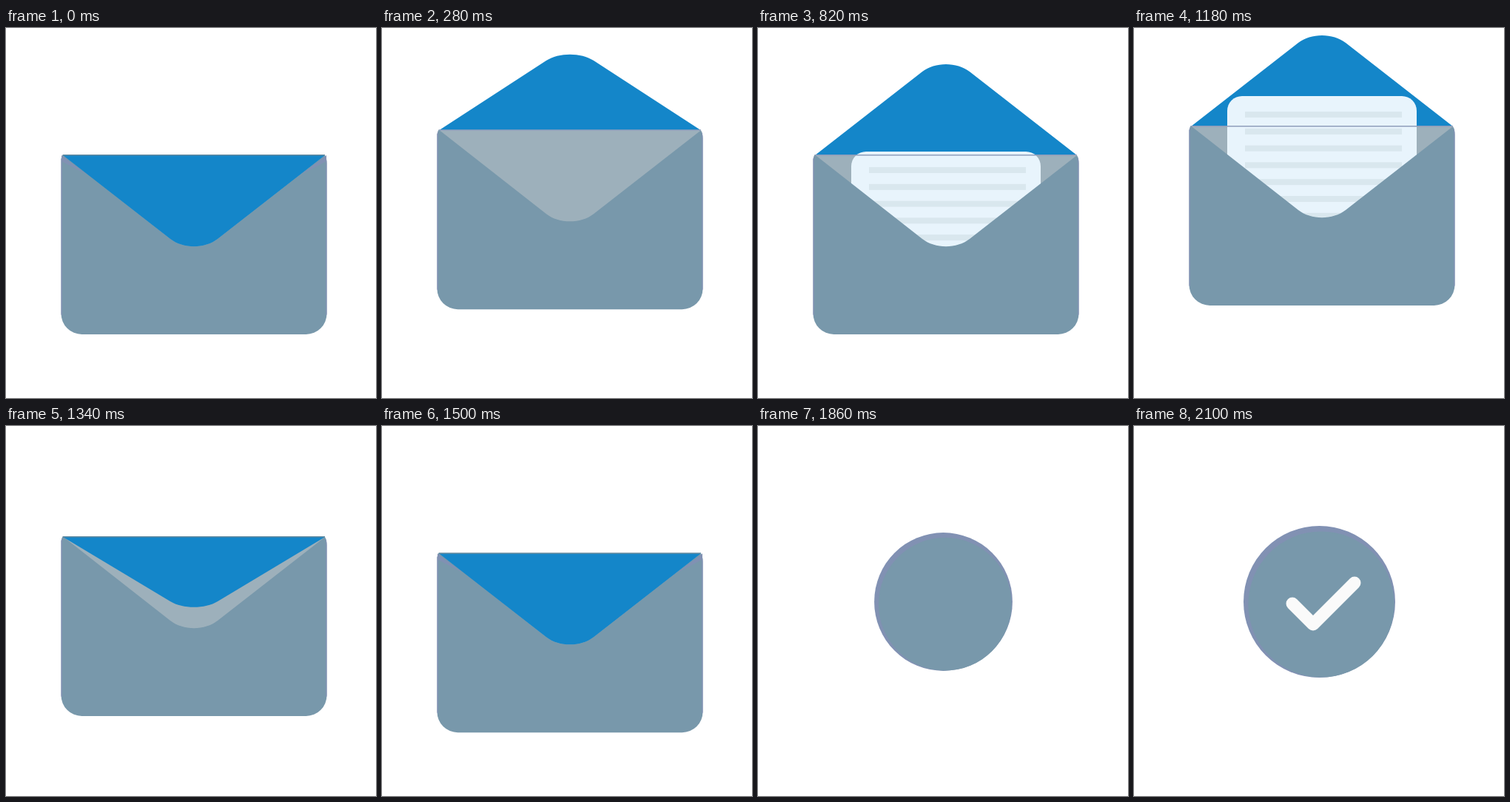
An HTML page with a canvas that plays this animation: 500 by 500 pixels, repeating every 2.4 s.

```html
<!DOCTYPE html>
<html lang="en">
<head>
<meta charset="utf-8">
<title>Letter sent</title>
<style>
html, body { margin: 0; width: 100%; height: 100%; overflow: hidden; background: #fff; }
canvas { display: block; width: 100%; height: 100%; }
</style>
</head>
<body>
<canvas id="stage" width="500" height="500"></canvas>
<script>
const g = document.getElementById('stage').getContext('2d');
const LOOP = 2400, STEP = 20;
const BLUE = '#1486c9', FRONT = '#7898ab', BACK = '#9db0bb', RIM = '#8191b3';
const PAPER = '#e8f4fc', RULE = '#d9e7ee';

// Monotone cubic through [time, value] keys, held at both ends
function track(keys) {
  const n = keys.length;
  const slope = i => (keys[i + 1][1] - keys[i][1]) / (keys[i + 1][0] - keys[i][0]);
  const tan = keys.map((k, i) => {
    if (i === 0 || i === n - 1) return 0;
    const a = slope(i - 1), b = slope(i);
    return a * b <= 0 ? 0 : 2 * a * b / (a + b);
  });
  return t => {
    if (t <= keys[0][0]) return keys[0][1];
    if (t >= keys[n - 1][0]) return keys[n - 1][1];
    let i = 0;
    while (t >= keys[i + 1][0]) i++;
    const [t0, a] = keys[i], [t1, b] = keys[i + 1];
    const d = t1 - t0, u = (t - t0) / d, v = 1 - u;
    return a * (1 + 2 * u) * v * v + tan[i] * d * u * v * v +
      b * u * u * (3 - 2 * u) - tan[i + 1] * d * u * u * v;
  };
}

const bodyTop = track([[0, 172], [330, 136], [500, 162], [590, 172], [950, 172],
  [1080, 145], [1160, 132], [1180, 133], [1340, 150], [1450, 173], [1520, 172]]);
const flapScale = track([[0, 1], [160, 0.1], [330, -1], [1180, -1], [1340, 0.77], [1420, 1]]);
const letterTop = track([[430, -345], [500, -312], [820, -5], [900, 6], [1060, -16],
  [1180, -41], [1285, 135], [1340, 150]]);
const rise = track([[1620, 0], [1660, -7], [1720, -36], [1832, -12]]);
const badge = track([[1740, 0], [1900, 1.08], [2000, 0.97], [2100, 1]]);
const tick = track([[1880, 0], [2100, 1]]);

function fill(color) {
  g.fillStyle = color;
  g.fill();
}

// Rounded V from the left corner to the right one
function vee() {
  g.lineTo(222, 113);
  g.bezierCurveTo(239, 126.5, 269, 126.5, 286, 113);
  g.lineTo(431, 0);
}

function flap(scale) {
  g.save();
  g.scale(1, scale);
  g.beginPath();
  g.moveTo(77, 0);
  vee();
  g.closePath();
  g.restore();
  fill(BLUE);
}

function letter(y) {
  const h = 204, top = -138;
  g.save();
  g.beginPath();
  g.rect(74, top, 360, 378);
  g.clip();
  g.beginPath();
  g.roundRect(126, y, 256, h, 20);
  fill(PAPER);
  g.fillStyle = RULE;
  for (let i = 0; i < 8; i++) g.fillRect(150, y + 21 + 22.8 * i, 212, 8);
  if (y < top && y + h > top) {
    g.fillStyle = '#a3a9ad';
    g.fillRect(126, top, 256, 1);
  }
  g.restore();
}

function pocketPath() {
  g.beginPath();
  g.moveTo(76.5, -1);
  vee();
  g.quadraticCurveTo(433.5, 4, 433.5, 11);
  g.lineTo(433.5, 214);
  g.arcTo(433.5, 242, 405.5, 242, 28);
  g.lineTo(102.5, 242);
  g.arcTo(74.5, 242, 74.5, 214, 28);
  g.lineTo(74.5, 5);
  g.closePath();
}

function pocket(edge) {
  pocketPath();
  fill(FRONT);
  g.save();
  g.clip();
  g.fillStyle = RIM;
  g.fillRect(74, 0, edge, 216);
  g.fillRect(434 - edge, 0, edge, 216);
  g.restore();
}

function cornerWedges() {
  for (const side of [-1, 1]) {
    g.beginPath();
    g.moveTo(254 + side * 179, 0);
    g.lineTo(254 + side * 145, 26);
    g.lineTo(254 + side * 179, 8);
    fill(RIM);
  }
}

function envelope(t) {
  const p = Math.max(0, (t - 1620) / 212), q = p * p;
  if (p >= 1) return;
  const s = flapScale(t);
  g.save();
  g.translate(250, 250 + rise(t));
  g.rotate(-Math.PI * q);
  g.scale(1 - q, 1 - q);
  g.translate(-250, bodyTop(t) - 250);
  if (s < 0) flap(s);
  g.fillStyle = BACK;
  g.fillRect(78, 0, 352, 128);
  letter(letterTop(t));
  pocket(p > 0 ? 3.5 : 2);
  if (s > 0.9) cornerWedges();
  if (s > 0) flap(s);
  g.fillStyle = s > 0 ? '#60899f' : '#8f9ebb';
  g.fillRect(77, -1, 354, 1.5);
  g.restore();
}

function disc(x, y, r, color) {
  g.beginPath();
  g.arc(x, y, r, 0, 2 * Math.PI);
  fill(color);
}

function checkMark(u) {
  if (u <= 0) return;
  const pts = [[214, 240], [242, 268], [298, 212]];
  let left = u * 3;
  g.beginPath();
  g.moveTo(...pts[0]);
  for (let i = 0; i < 2 && left > 0; i++) {
    const part = Math.min(1, left / (i + 1));
    const [a, b] = [pts[i], pts[i + 1]];
    g.lineTo(a[0] + (b[0] - a[0]) * part, a[1] + (b[1] - a[1]) * part);
    left -= i + 1;
  }
  g.lineWidth = 17;
  g.lineCap = g.lineJoin = 'round';
  g.strokeStyle = '#fafafa';
  g.stroke();
}

function sentBadge(t) {
  const s = badge(t);
  if (s <= 0) return;
  g.save();
  g.translate(250.5, 237.5);
  g.scale(s, s);
  g.translate(-250.5, -237.5);
  disc(250.5, 237.5, 102.5, RIM);
  disc(253, 241, 98.6, FRONT);
  checkMark(tick(t));
  g.restore();
}

function draw(t) {
  g.fillStyle = '#fff';
  g.fillRect(0, 0, 500, 500);
  envelope(t);
  sentBadge(t);
}

let start;
function loop(now) {
  if (start === undefined) start = now;
  const t = Math.max(0, now - start) % LOOP;
  draw(Math.floor(t / STEP) * STEP);
  requestAnimationFrame(loop);
}
draw(0);
requestAnimationFrame(loop);
</script>
</body>
</html>
```
